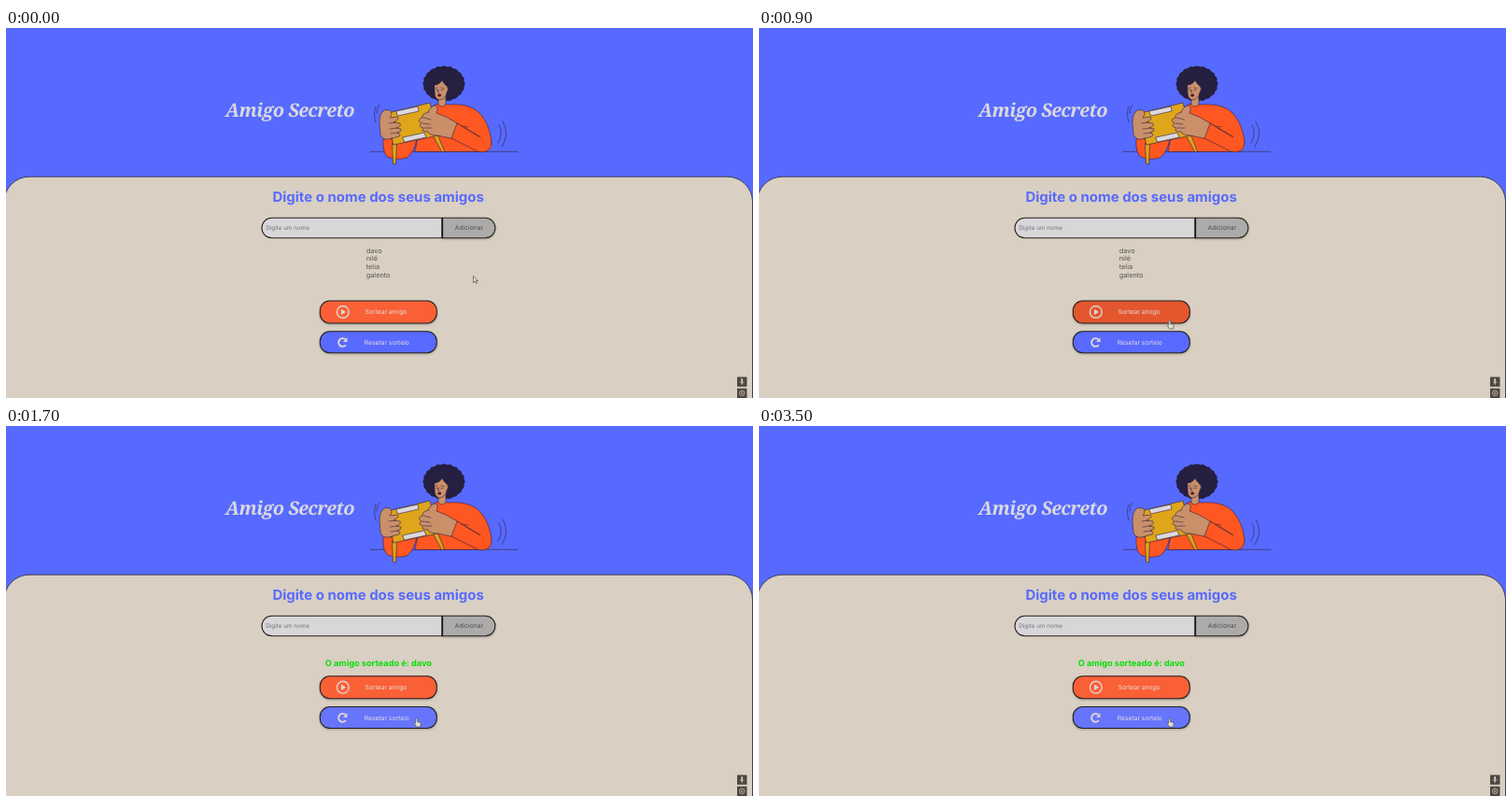
These frames come from a looping animation (800x396 px, 3700 ms). An HTML page:

```html
<!DOCTYPE html>
<html lang="pt-BR">
<head>
<meta charset="utf-8">
<title>Amigo Secreto</title>
<style>
  html, body { margin: 0; width: 100%; height: 100%; overflow: hidden; background: #576aff; }
  svg { display: block; width: 100vw; height: 100vh; }
  text { font-family: Inter, "Open Sans", sans-serif; text-rendering: geometricPrecision; }
  .title { font: italic 800 20px "Noto Serif", serif; letter-spacing: -.6px; fill: #d9d8de; }
  .heading { font-size: 15px; font-weight: 700; fill: #586aff; }
  .label { font-size: 6.75px; fill: #e5dfdc; }
  .list { font-size: 7.3px; fill: #57524b; }
  .winner { font-size: 9.2px; font-weight: 700; fill: #05df05; }
  .mid { text-anchor: middle; }
  .box { stroke: #241f1c; stroke-width: 1.05; }
  .ink { stroke: #30213d; stroke-width: .6; stroke-linejoin: round; stroke-linecap: round; }
  .line { fill: none; }
  .skin { fill: #c9906a; }
  .shirt { fill: #ff5722; }
  .gold { fill: #dfa51b; }
  .shadow { filter: drop-shadow(0 1.5px 1.2px rgba(0, 0, 0, .25)); }
  .icon { fill: none; stroke: #ded7d5; }
</style>
</head>
<body>
<svg viewBox="0 0 800 396" preserveAspectRatio="none">
  <rect width="800" height="396" fill="#576aff"/>
  <text class="title mid" x="304" y="95">Amigo Secreto</text>

  <g id="drummer">
    <path class="ink line" d="M390 132.300H548M396 84q-3 8 0 17M400 82q-3 4-3 9M528 104q5 9-1 19M532 100q8 13-1 27"/>
    <path class="ink shirt" d="M438 132.300L442 112L457 84Q460 81 464 81L474 82Q489 81 498 85C511 90 518 106 520 121Q520 132 508 132.300Z"/>
    <path id="hair" fill="#251f40"/>
    <path class="ink skin" d="M463 72V82Q466 86 471 82L471 72Z"/>
    <path class="ink skin" d="M459 61Q464 61 467 56Q470 61 472 62Q475 65 472 69Q471 76 464 77Q459 76 459 68Z"/>
    <path class="ink line" d="M460 64.500l2-.5M466 64l3 .7M461 66.500h1.500M466 66.500h2M463.500 66l-1 3h1.500"/>
    <ellipse cx="464.200" cy="72" rx="2" ry="1.500" fill="#4a1726"/>
    <path class="ink shirt" d="M404 119Q403 134 409 138Q417 142 429 139Q437 134 440 119Z"/>
    <path class="ink gold" d="M413.500 124l1 21.500 3 .5 1-22ZM456 113l11 20 2.500-1-8-20Z"/>
    <path class="ink gold" d="M409 91L454 80L463 115L415 125Z"/>
    <path class="ink" fill="#dcd8df" d="M418 89L441 84L442 89L420 94ZM425 117L448 112L450 117L427 122Z"/>
    <path class="ink skin" d="M405 88Q400 91 400 101L401 114Q403 120 410 119L421 116Q424 114 419 112Q424 111 423 108L418 107Q424 105 422 102L415 101Q422 98 419 95L411 96Q415 91 411 88Z"/>
    <path class="ink line" d="M410 102l7-1M411 108l8-1M412 113l8-1"/>
    <path class="ink skin" d="M452 90Q455 83 460 83Q464 85 461 91L471 95L487 104L481 119L462 115Q453 115 452 111Q443 111 447 107Q440 105 445 102Q439 98 446 96Q445 92 452 90Z"/>
    <path class="ink line" d="M447 96l8 2M446 102l8 1M448 107l8 0"/>
    <path class="shirt" d="M483 102L507 113L500 106Q511 109 520 121C521 131 515 134 506 132.500L477 118Z"/>
    <path class="ink line" d="M507 116L483 102L477 118L506 132.500Q520 135 520 121M491 107l17 10M488 105l7 1"/>
  </g>

  <rect x="-2" y="159.200" width="801.500" height="300" rx="27" fill="#d9d0c3" stroke="#292735" stroke-width=".8"/>
  <text class="heading mid" x="398.700" y="186.400">Digite o nome dos seus amigos</text>

  <g class="shadow">
    <path class="box" fill="#acabaa" d="M467.500 203.300H513.200A10.700 10.700 0 0 1 513.200 224.700H467.500Z"/>
  </g>
  <path class="box" fill="#d8d6d8" d="M467 203.300H284.700A10.700 10.700 0 0 0 284.700 224.700H467Z"/>
  <path d="M467.300 203V225" stroke="#1b1714" stroke-width="1.600"/>
  <text x="278.300" y="216.200" font-size="6.3" fill="#77747a">Digite um nome</text>
  <text class="mid" x="495.900" y="216.400" font-size="6.75" fill="#504e4d">Adicionar</text>

  <g id="friends"></g>
  <text id="winner" class="winner mid" x="398.800" y="257"></text>

  <g id="buttons">
    <g class="shadow">
      <rect id="draw" class="box" x="336.300" y="292" width="125" height="24" rx="10.500"/>
      <rect id="reset" class="box" x="336.300" y="324.700" width="125" height="23" rx="10.500"/>
    </g>
    <circle class="icon" cx="360.800" cy="303.900" r="6.400" stroke-width="1.400"/>
    <path d="M359 300.700L364 303.900L359 307.100Z" fill="#ded7d5"/>
    <text class="label mid" x="406.900" y="306.400">Sortear amigo</text>
    <path class="icon" d="M363.800 339.300A4.300 4.300 0 1 1 363.200 333.200" stroke-width="2"/>
    <path d="M361 336L365.500 331.300V336Z" fill="#ded7d5"/>
    <text class="label mid" x="407.800" y="338.900">Resetar sorteio</text>
  </g>

  <g fill="#4d4742">
    <rect x="783" y="373.500" width="10.500" height="10.300"/>
    <rect x="783" y="385.700" width="10.500" height="10.300"/>
  </g>
  <g fill="none" stroke="#d5cdc4" stroke-width=".8">
    <path d="M788.200 376v3" stroke-width="1.800" stroke-linecap="round"/>
    <path d="M786 378.500q2.200 3.500 4.400 0M788.200 380.300v1.700"/>
    <circle cx="788.200" cy="390.800" r="2.700"/>
    <circle cx="788.200" cy="390.800" r=".7"/>
  </g>

  <g id="cursor" stroke="#55504c" stroke-width=".7" stroke-linejoin="round" fill="#e0dbd4">
    <path id="arrow" d="M0 0V7L1.600 5.500L2.800 8L4 7.400L2.900 5H5Z"/>
    <path id="hand" d="M-1 .5Q0-.7 1 .5V3.500L4 4.300Q5 4.800 4.700 6L4 9H0L-2.500 5.600Q-2.300 4.500-1 5.300Z"/>
  </g>
</svg>
<script>
const LOOP = 3700, STEP = 100, HOVER_AT = 500, DRAWN_AT = 1700;
const friends = ["davo", "nilé", "telia", "galento"];
// Pointer stops: time, x, y
const track = [[0, 500.5, 265.5], [300, 470.5, 315], [600, 441, 313.3], [700, 439.6, 313]];
const $ = id => document.getElementById(id);
const show = (id, on) => $(id).setAttribute("visibility", on ? "visible" : "hidden");

$("friends").innerHTML = friends
  .map((name, i) => `<text class="list" x="385.8" y="${240.6 + i * 8.8}">${name}</text>`).join("");
$("winner").textContent = "O amigo sorteado é: " + friends[0];

// Scalloped outline for the curly hair
const curls = Array.from({ length: 120 }, (_, i) => {
  const a = i * Math.PI / 60, r = 1 + .02 * Math.cos(20 * a);
  return `${(469 + 22.2 * r * Math.cos(a)).toFixed(2)} ${(59.6 + 18.8 * r * Math.sin(a)).toFixed(2)}`;
});
$("hair").setAttribute("d", `M${curls.join("L")}Z`);

function cursorAt(t) {
  const next = track.findIndex(point => point[0] > t);
  if (next < 0) return track[track.length - 1].slice(1);
  const [t0, x0, y0] = track[next - 1], [t1, x1, y1] = track[next];
  const k = (t - t0) / (t1 - t0);
  return [x0 + (x1 - x0) * k, y0 + (y1 - y0) * k];
}

function render(now) {
  const t = Math.floor(now % LOOP / STEP) * STEP;
  const hover = t >= HOVER_AT, drawn = t >= DRAWN_AT;
  show("friends", !drawn);
  show("winner", drawn);
  show("arrow", !hover);
  show("hand", hover);
  $("buttons").setAttribute("transform", `translate(0 ${drawn ? -24.2 : 0})`);
  $("draw").setAttribute("fill", hover && !drawn ? "#e3562e" : "#fa6036");
  $("reset").setAttribute("fill", drawn ? "#6675fb" : "#586aff");
  $("cursor").setAttribute("transform", `translate(${cursorAt(t).join(" ")})`);
}

const start = performance.now();
function tick() {
  render(performance.now() - start);
  requestAnimationFrame(tick);
}
tick();
</script>
</body>
</html>
```
